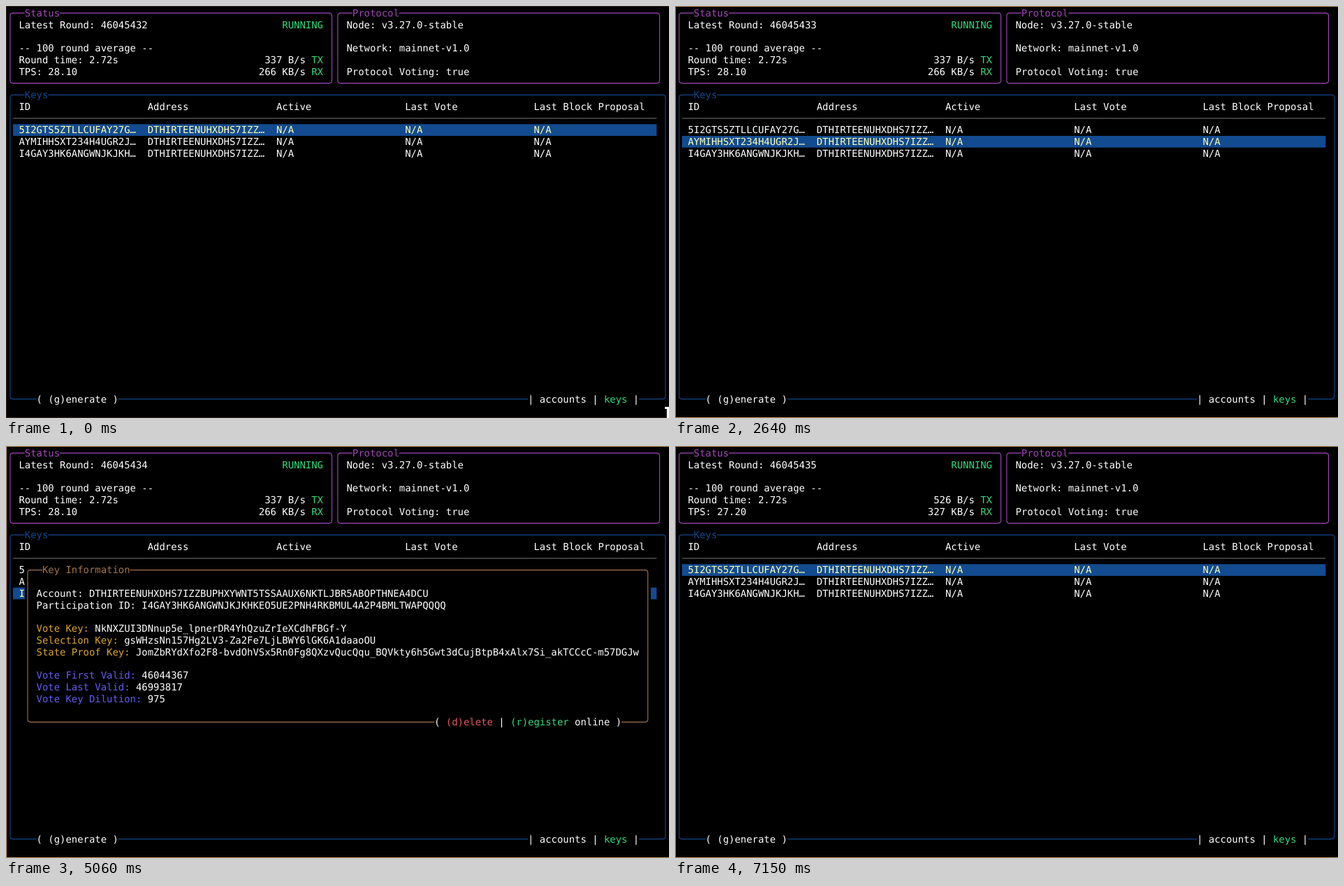
Write an HTML page that moves like this. It is 949 px wide and 590 px high and loops after 7.58 s.

```html
<!DOCTYPE html>
<html lang="en">
<head>
<meta charset="utf-8">
<title>Node terminal</title>
<style>
  html, body { margin: 0; width: 100%; height: 100%; overflow: hidden; background: #000; }
  svg { display: block; width: 949px; height: 590px; }
  text {
    font-family: "DejaVu Sans Mono", "Liberation Mono", monospace;
    white-space: pre;
    text-rendering: geometricPrecision;
  }
  .keycap text { font: bold 57px "DejaVu Sans", sans-serif; }
</style>
</head>
<body>
<svg id="stage" viewBox="0 0 949 590"></svg>
<script>
const LOOP = 7580;
const CW = 8.375, RH = 16.75, X0 = 1.7, Y0 = 1.7;
const FONT = CW / 0.60205;
const C = {
  white: '#ffffff', green: '#33da7a', purple: '#a347ba', blue: '#12488b',
  brown: '#a2734c', gold: '#dda62c', violet: '#655cf2', red: '#ec5660',
  cream: '#ffffaf', grey: '#626262', frame: '#c99a68'
};

const stage = document.getElementById('stage');
const colX = c => X0 + c * CW;
const rowY = r => Y0 + r * RH;
const midX = c => colX(c + 0.5);
const midY = r => rowY(r + 0.5);

function add(parent, tag, attrs) {
  const el = document.createElementNS('http://www.w3.org/2000/svg', tag);
  for (const k in attrs) el.setAttribute(k, attrs[k]);
  parent.appendChild(el);
  return el;
}
const group = (parent, cls = '') => add(parent, 'g', { class: cls });
const rect = (parent, x, y, width, height, fill) => add(parent, 'rect', { x, y, width, height, fill });
const path = (parent, d, stroke, width = 1.1) =>
  add(parent, 'path', { d, stroke, 'stroke-width': width, fill: 'none' });
const show = (el, on) => el.setAttribute('display', on ? 'inline' : 'none');

function label(parent, col, row, str, fill = C.white) {
  const el = add(parent, 'text', { x: colX(col), y: rowY(row) + 13.2, fill, 'font-size': FONT });
  el.textContent = str;
  return el;
}

// Consecutive coloured pieces on one line: [text, colour], ...
function line(parent, col, row, ...parts) {
  for (const [str, fill] of parts) {
    label(parent, col, row, str, fill);
    col += str.length;
  }
}

// Rounded box; gaps are [from, to] columns left free in the top and bottom edges.
function box(parent, c0, r0, c1, r1, color, topGap, bottomGaps = []) {
  const l = midX(c0), r = midX(c1), t = midY(r0), b = midY(r1), q = 4;
  const edge = (y, gaps) => {
    let d = `M${l + q} ${y}`;
    for (const [a, z] of gaps) d += `H${colX(a)}M${colX(z)} ${y}`;
    return d + `H${r - q}`;
  };
  path(parent,
    edge(t, [topGap]) + `Q${r} ${t} ${r} ${t + q}V${b - q}Q${r} ${b} ${r - q} ${b}` +
    edge(b, bottomGaps) + `M${l + q} ${b}Q${l} ${b} ${l} ${b - q}V${t + q}Q${l} ${t} ${l + q} ${t}`,
    color);
}

// Window frame
const frame = path(stage, 'M949 .5H.5V589.5H949', C.frame, 1);

// Status and protocol panels
box(stage, 0, 0, 55, 6, C.purple, [3, 9]);
label(stage, 3, 0, 'Status', C.purple);
const round = label(stage, 2, 1, '');
label(stage, 47, 1, 'RUNNING', C.green);
label(stage, 2, 3, '-- 100 round average --');
label(stage, 2, 4, 'Round time: 2.72s');
const tps = label(stage, 2, 5, '');
const tx = label(stage, 44, 4, '');
const rx = label(stage, 43, 5, '');
label(stage, 52, 4, 'TX', C.green);
label(stage, 52, 5, 'RX', C.green);

box(stage, 56, 0, 111, 6, C.purple, [59, 67]);
label(stage, 59, 0, 'Protocol', C.purple);
label(stage, 58, 1, 'Node: v3.27.0-stable');
label(stage, 58, 3, 'Network: mainnet-v1.0');
label(stage, 58, 5, 'Protocol Voting: true');

// Keys table
const COLS = [2, 24, 46, 68, 90];
box(stage, 0, 7, 112, 33, C.blue, [3, 7], [[5, 19], [89, 108]]);
label(stage, 3, 7, 'Keys', C.blue);
['ID', 'Address', 'Active', 'Last Vote', 'Last Block Proposal']
  .forEach((h, i) => label(stage, COLS[i], 8, h));
path(stage, `M${colX(1)} ${midY(9)}H${colX(111)}`, C.grey);
const bar = rect(stage, colX(1), 0, 110 * CW, RH, '#134b90');
const rows = ['5I2GTS5ZTLLCUFAY27G…', 'AYMIHHSXT234H4UGR2J…', 'I4GAY3HK6ANGWNJKJKH…'].map((id, r) => {
  const g = group(stage);
  [id, 'DTHIRTEENUHXDHS7IZZ…', 'N/A', 'N/A', 'N/A']
    .forEach((s, i) => label(g, COLS[i], 10 + r, s, 'inherit'));
  return g;
});
label(stage, 5, 33, '( (g)enerate )');
line(stage, 89, 33, ['| accounts | ', C.white], ['keys', C.green], [' |', C.white]);

// Key information dialog
const dialog = group(stage);
rect(dialog, colX(3), rowY(10), 107 * CW, 14 * RH, '#000');
box(dialog, 3, 10, 109, 23, C.brown, [6, 21], [[73, 105]]);
label(dialog, 6, 10, 'Key Information', C.brown);
[
  [12, 'Account: ', 'DTHIRTEENUHXDHS7IZZBUPHXYWNT5TSSAAUX6NKTLJBR5ABOPTHNEA4DCU', C.white],
  [13, 'Participation ID: ', 'I4GAY3HK6ANGWNJKJKHKEO5UE2PNH4RKBMUL4A2P4BMLTWAPQQQQ', C.white],
  [15, 'Vote Key: ', 'NkNXZUI3DNnup5e_lpnerDR4YhQzuZrIeXCdhFBGf-Y', C.gold],
  [16, 'Selection Key: ', 'gsWHzsNn157Hg2LV3-Za2Fe7LjLBWY6lGK6A1daaoOU', C.gold],
  [17, 'State Proof Key: ', 'JomZbRYdXfo2F8-bvdOhVSx5Rn0Fg8QXzvQucQqu_BQVkty6h5Gwt3dCujBtpB4xAlx7Si_akTCCcC-m57DGJw', C.gold],
  [19, 'Vote First Valid: ', '46044367', C.violet],
  [20, 'Vote Last Valid: ', '46993817', C.violet],
  [21, 'Vote Key Dilution: ', '975', C.violet]
].forEach(([row, name, value, color]) => line(dialog, 5, row, [name, color], [value, C.white]));
line(dialog, 73, 23, ['( ', C.white], ['(d)elete', C.red], [' | ', C.white],
  ['(r)egister', C.green], [' online )', C.white]);

// Key press overlay
const overlay = group(stage, 'keycap');
rect(overlay, 0, 440, 949, 120, '#000');
const CENTER = 440.2, KEY_W = 48;
const arrow = (g, x, flip) => {
  const a = group(g);
  a.setAttribute('transform', `translate(${x} 499)${flip ? ' scale(1 -1)' : ''}`);
  path(a, 'M0 -18V22', '#fff', 7.5);
  path(a, 'M-11.2 -6.5L0 -17.7L11.2 -6.5', '#fff', 6.2);
};
const draw = {
  down: g => arrow(g, CENTER, true),
  up: g => arrow(g, CENTER),
  upUp: g => [-0.5, 0.5].forEach(k => arrow(g, CENTER + k * KEY_W)),
  enter: g => path(g, 'M421.2 501.3L431.3 491V496.3H448.5V479.5H460V508H431.3V512.7Z', '#fff', 4),
  esc: g => {
    const t = add(g, 'text', { x: CENTER, y: 517, fill: '#fff', 'text-anchor': 'middle' });
    t.textContent = 'Esc';
  }
};
const caps = {};
for (const name in draw) draw[name](caps[name] = group(overlay));
const under = rect(overlay, 0, 520.8, KEY_W, 2.7, '#fff');

// Text pointer, cut off by the corner of the stage
const pointer = group(stage);
path(pointer, 'M943 575.5H951', '#fff', 3);
path(pointer, 'M947.5 575V590', '#fff', 3.4);

// Timeline: [start, key, selected row, dialog open, underline centre, underline width]
const HOLD = 670, RECENT = 100;
const presses = [
  [1700, 'down', 1, false, CENTER, KEY_W],
  [2750, 'down', 2, false, CENTER, KEY_W],
  [3790, 'enter', 2, true, CENTER, KEY_W],
  [5090, 'esc', 2, false, CENTER, 107],
  [5930, 'up', 1, false, CENTER, KEY_W],
  [6390, 'upUp', 0, false, CENTER + KEY_W / 2, KEY_W]
];
const ROUNDS = [450, 3220, 5910];

function render(t) {
  const [start, key, sel, open, ux, uw] =
    presses.filter(p => t >= p[0]).pop() || [-LOOP, '', 0, false, 0, 0];

  const fade = Math.min(1, Math.max(0, (t - 760) / 270));
  frame.setAttribute('opacity', 0.25 + 0.75 * fade);

  const n = ROUNDS.filter(at => t >= at).length;
  const late = n === 3;
  round.textContent = 'Latest Round: ' + (46045432 + n);
  tps.textContent = 'TPS: ' + (late ? '27.20' : '28.10');
  tx.textContent = (late ? 526 : 337) + ' B/s';
  rx.textContent = (late ? 327 : 266) + ' KB/s';

  bar.setAttribute('y', rowY(10 + sel));
  rows.forEach((g, i) => g.setAttribute('fill', i === sel ? C.cream : C.white));
  show(dialog, open);

  show(overlay, t < start + HOLD);
  for (const name in caps) show(caps[name], name === key);
  show(under, t < start + RECENT);
  under.setAttribute('x', ux - uw / 2);
  under.setAttribute('width', uw);

  show(pointer, t < presses[0][0]);
  pointer.setAttribute('transform', `translate(${t < 760 ? 0 : -1} 0)`);
}

function tick() {
  render(performance.now() % LOOP);
  requestAnimationFrame(tick);
}
tick();
</script>
</body>
</html>
```
